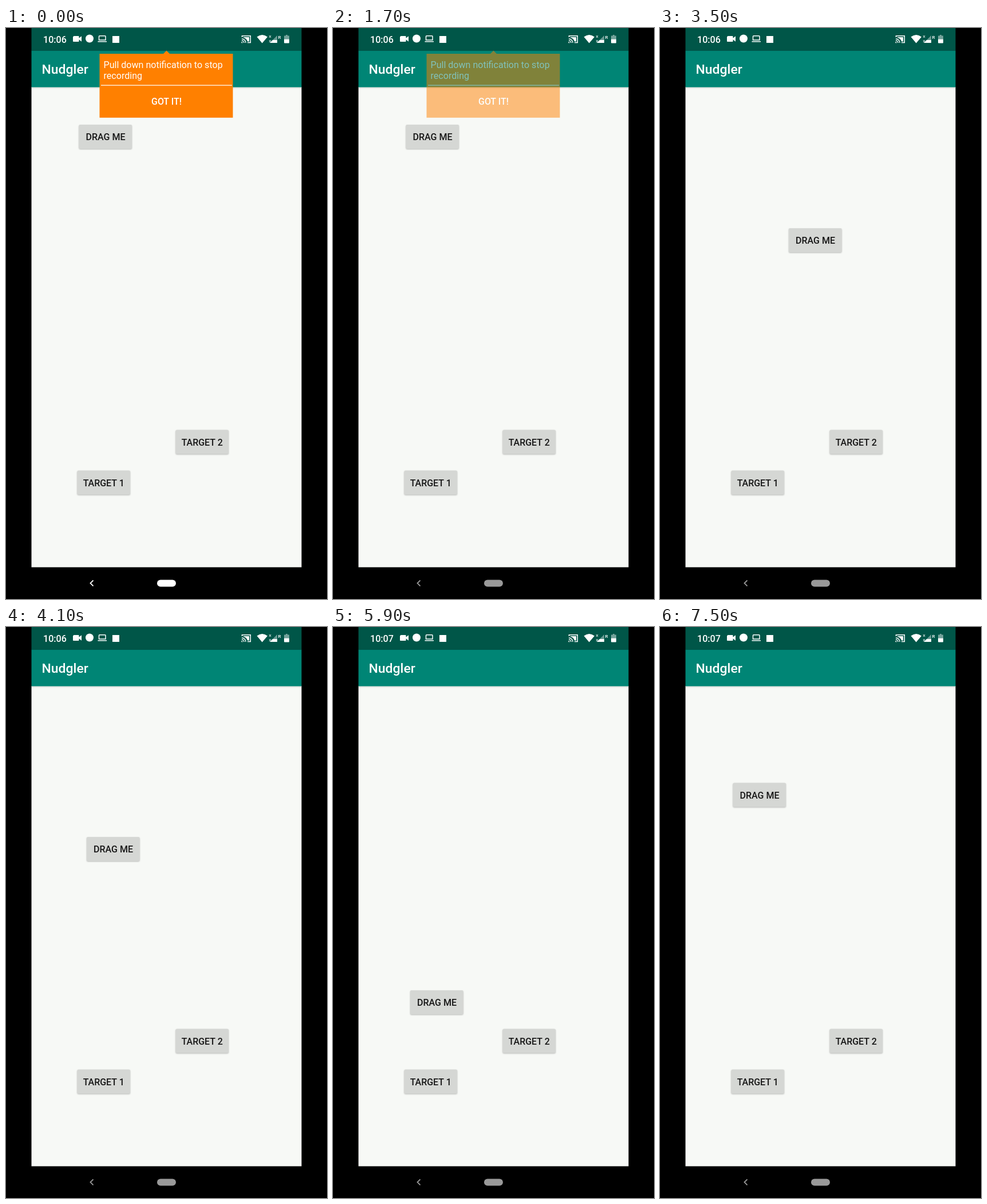
An HTML page for the animation above (8000 ms loop, 561 by 998 pixels).

```html
<!DOCTYPE html>
<html lang="en">
<head>
<meta charset="utf-8">
<title>Drag demo</title>
<style>
  html, body { margin: 0; width: 100%; height: 100%; overflow: hidden; background: #000; }
  svg { display: block; font: 500 16.07px Roboto, sans-serif; fill: #fff; }
  .button { fill: #161616; text-anchor: middle; }
  .button rect { fill: #d5d7d4; filter: drop-shadow(0 1px 1px rgba(0, 0, 0, .26)); }
  .line { fill: none; stroke: #fff; }
</style>
</head>
<body>
<svg width="561" height="998" viewBox="0 0 561 998">
  <defs>
    <linearGradient id="shade" x2="0" y2="1">
      <stop stop-opacity=".13"/>
      <stop offset="1" stop-opacity="0"/>
    </linearGradient>
    <rect id="plate" width="92.5" height="42" rx="2"/>
  </defs>
  <path fill="#f7f9f6" d="M44.5 103h472v839.5h-472z"/>
  <path fill="url(#shade)" d="M44.5 103h472v4h-472z"/>
  <path fill="#005648" d="M44.5 0h472v39.5h-472z"/>
  <path fill="#008575" d="M44.5 39.5h472v64h-472z"/>
  <text x="62.5" y="80" font-size="22.96">Nudgler</text>

  <!-- status bar -->
  <text id="clock" x="65" y="26"></text>
  <path d="M118 14h8.500q1 0 1 1v2.700l4.500-3.500v9.600l-4.500-3.500v2.700q0 1-1 1H118q-1 0-1-1v-7q0-1 1-1z"/>
  <circle cx="146" cy="18.500" r="7"/>
  <path class="line" stroke-width="1.500" d="M163.500 13.700h9.500q1 0 1 1v6.300h-11.500v-6.300q0-1 1-1zM160.500 23.700h15.500"/>
  <path d="M186 14h12v12h-12z"/>
  <g class="line" stroke-width="1.500">
    <path d="M412.500 16v-2.300h14.800v11.800h-5.300M412 22a4 4 0 0 1 4 4M412 19a7 7 0 0 1 7 7"/>
    <path stroke="none" fill="#fff" d="M415 16h10v7.500h-3a9 9 0 0 0-7-6.500zM411.500 24a2.200 2.200 0 0 1 2.200 2.200h-2.200z"/>
  </g>
  <path d="M438.500 15.500q9.200-7 18.500 0l-9.300 11z"/>
  <path d="M474 13v13h-13z" opacity=".4"/>
  <path d="M461 26l5-5h8v5z"/>
  <path class="line" d="M460 13l3 4m0-4l-3 4m0 4l3 4m0-4l-3 4" stroke-width=".9"/>
  <text x="475.500" y="19" font-size="8">R</text>
  <path d="M489 12h3v1.500h3v6h-9v-6h3z" opacity=".45"/>
  <path d="M486 19.500h9v6q0 1-1 1h-7q-1 0-1-1z"/>

  <!-- buttons -->
  <g class="button" transform="translate(296.500 702.500)">
    <use href="#plate" fill="#d5d7d4" style="filter:drop-shadow(0 1px 1px rgba(0,0,0,.26))"/>
    <text x="46.200" y="27.300">TARGET 2</text>
  </g>
  <g class="button" transform="translate(124.500 773.500)">
    <use href="#plate" fill="#d5d7d4" style="filter:drop-shadow(0 1px 1px rgba(0,0,0,.26))"/>
    <text x="46.200" y="27.300">TARGET 1</text>
  </g>
  <g class="button" id="drag">
    <use href="#plate" fill="#d5d7d4" style="filter:drop-shadow(0 1px 1px rgba(0,0,0,.26))"/>
    <text x="46.500" y="27.300">DRAG ME</text>
  </g>

  <!-- recording hint -->
  <g id="hint">
    <path fill="#ff8000" d="M163.500 45H275l5.500-5.500L286 45h110.500v111.700h-233z"/>
    <path d="M166 99.500h229v1.200h-229z"/>
    <g font-weight="400">
      <text x="170.500" y="70">Pull down notification to stop</text>
      <text x="170.500" y="89">recording</text>
    </g>
    <text x="280.500" y="134" text-anchor="middle">GOT IT!</text>
  </g>

  <!-- navigation bar -->
  <g id="nav">
    <path class="line" stroke-width="1.800" d="M152.500 965.300l-5 5 5 5"/>
    <rect x="264" y="964.500" width="33" height="12" rx="6"/>
  </g>
</svg>
<script>
const LOOP = 8000, STEP = 100, RETURN = 300;
const HOME = [127.5, 272.5];
const $ = id => document.getElementById(id);
const clamp = v => Math.max(0, Math.min(1, v));
const mix = (a, b, k) => a + (b - a) * k;
const ease = k => (1 - Math.cos(Math.PI * k)) / 2;
const overshoot = k => (k - 1) ** 2 * (3 * (k - 1) + 2) + 1;

// Each drag lists [ms, x, y]; its last point is the release.
const drags = [
  [[2900, 127.5, 169], [3000, 152.5, 170], [3200, 200, 215], [3500, 225, 350],
   [3700, 190, 446], [3900, 115, 440], [4000, 104, 405], [4100, 141, 367],
   [4300, 210, 400], [4500, 270, 518], [4600, 281, 526], [4800, 310, 512]],
  [[5400, ...HOME], [5500, 124, 312], [5700, 95, 480], [5900, 135, 635], [6000, 150, 657]],
  [[6600, ...HOME], [6700, 157, 308.5], [6900, 225, 440], [7100, 299, 605], [7200, 309, 636]]
];

function position(t) {
  const drag = drags.findLast(d => t >= d[0][0]) || drags[0];
  const end = drag.at(-1);
  if (t >= end[0]) {
    const k = overshoot(clamp((t - end[0]) / RETURN));
    return HOME.map((h, i) => mix(end[i + 1], h, k));
  }
  const next = Math.max(1, drag.findIndex(p => p[0] > t));
  const a = drag[next - 1], b = drag[next];
  const k = clamp((t - a[0]) / (b[0] - a[0]));
  return [mix(a[1], b[1], k), mix(a[2], b[2], k)];
}

function draw(now) {
  const t = Math.floor(now % LOOP / STEP) * STEP;
  $("clock").textContent = t < 4900 ? "10:06" : "10:07";
  $("hint").setAttribute("opacity", 1 - clamp((t - 1500) / 400));
  $("nav").setAttribute("opacity", mix(1, .6, ease(clamp(t / 1500))));
  $("drag").setAttribute("transform", `translate(${position(t)})`);
}

const start = performance.now();
function tick() {
  draw(performance.now() - start);
  requestAnimationFrame(tick);
}
tick();
</script>
</body>
</html>
```
